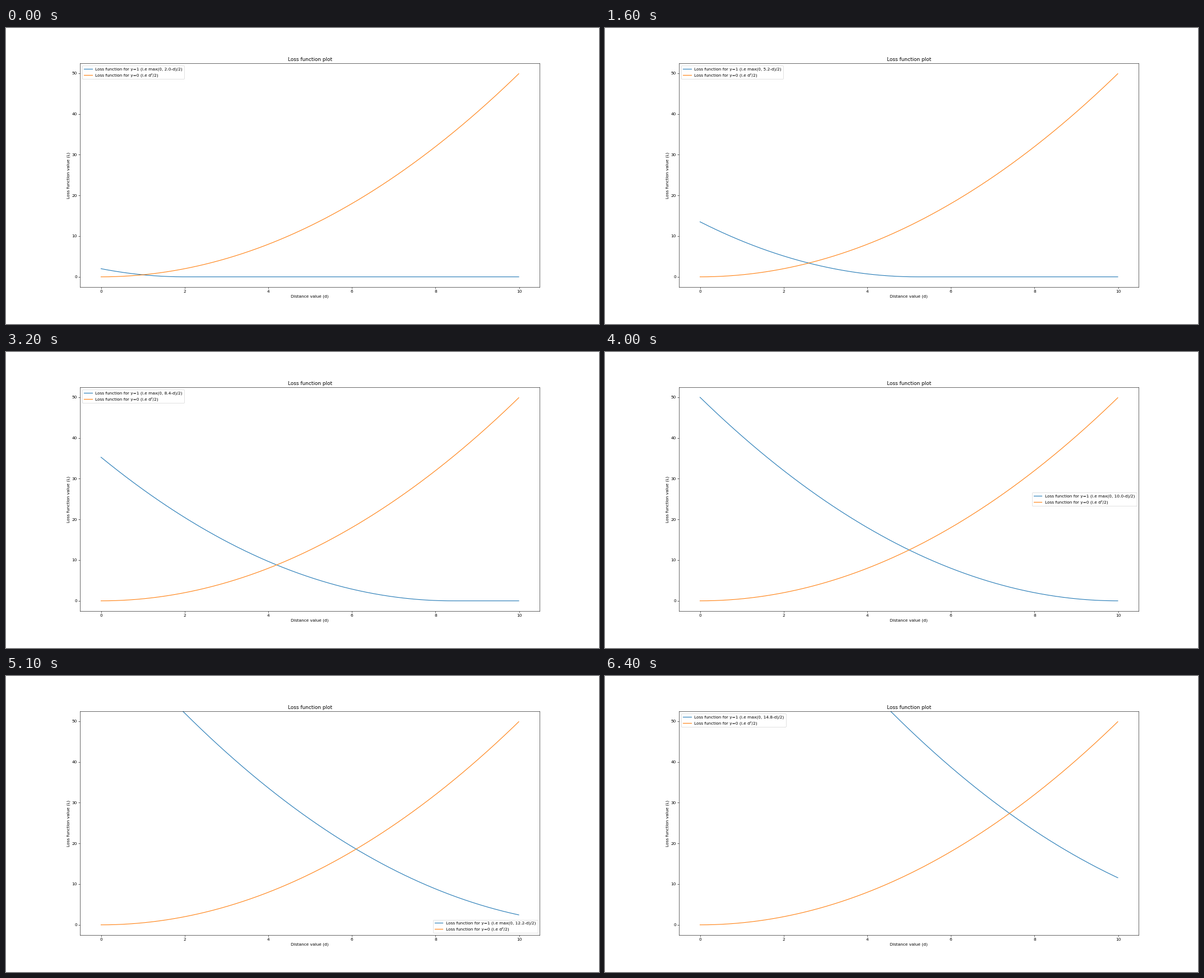
A matplotlib script for the animation above (6.5 s loop, 1058 by 529 pixels).

```python
import numpy as np
import matplotlib.pyplot as plt
from matplotlib.animation import FuncAnimation

FRAMES = 65
INTERVAL = 100  # ms
START, STEP = 2.0, 0.2

plt.rcParams.update({"font.family": "DejaVu Sans", "font.size": 10})

d = np.arange(0, 10, 0.01)


def similar_loss(margin):
    return np.maximum(0, margin - d) ** 2 / 2


def similar_label(margin):
    return f"Loss function for y=1 (i.e max(0, {margin:.1f}-d)/2)"


fig, ax = plt.subplots(figsize=(20, 10), dpi=52.9)
fig.subplots_adjust(left=0.125, right=0.9, bottom=0.125, top=0.88)

similar, = ax.plot(d, similar_loss(START), label=similar_label(START))
ax.plot(d, d ** 2 / 2, label="Loss function for y=0 (i.e d²/2)")
ax.set_title("Loss function plot")
ax.set_xlabel("Distance value (d)")
ax.set_ylabel("Loss function value (L)")

# Freeze the limits so the growing curve is clipped at the top
ax.set_xlim(ax.get_xlim())
ax.set_ylim(ax.get_ylim())

# "best" moves the box to a free spot on every draw
legend = ax.legend(loc="best")
margin_text = legend.get_texts()[0]


def update(i):
    margin = START + STEP * i
    similar.set_ydata(similar_loss(margin))
    margin_text.set_text(similar_label(margin))
    return similar, margin_text


anim = FuncAnimation(fig, update, frames=FRAMES, interval=INTERVAL,
                     repeat=True, repeat_delay=0, blit=False)
plt.show()
```
